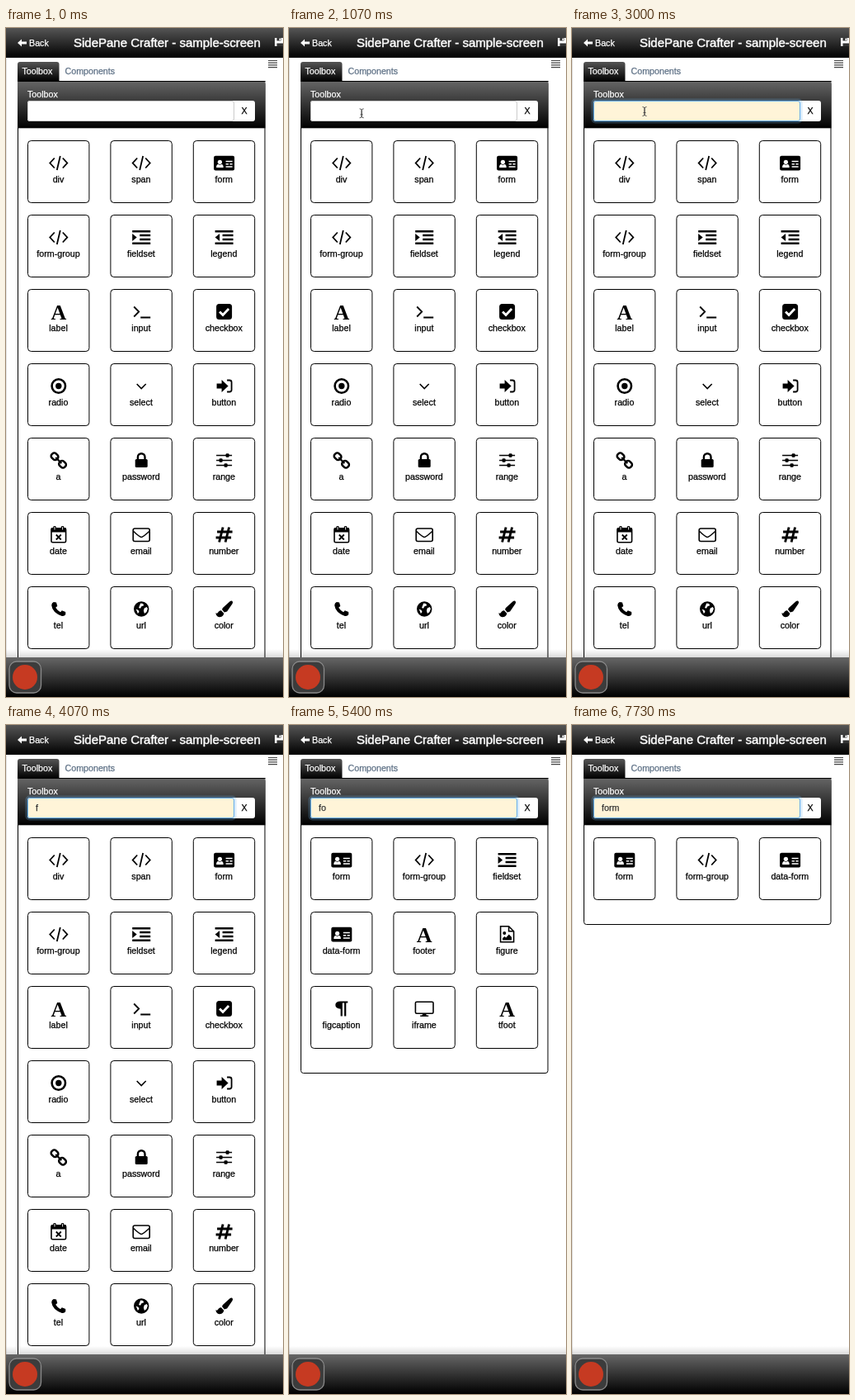
Animation, 336 px wide and 810 px high, one loop 8000 ms. Source, as an HTML page:

```html
<!DOCTYPE html>
<html lang="en">
<head>
<meta charset="utf-8">
<title>Toolbox search</title>
<style>
html, body { margin: 0; width: 100%; height: 100%; overflow: hidden; background: #fff; }
svg { display: block; width: 336px; height: 810px; }
text { font: 10.7px "Liberation Sans", Arial, sans-serif; stroke-width: .25; }
.title { font-size: 15px; stroke-width: .45; }
.white { fill: #fff; stroke: #fff; }
.black { fill: #000; stroke: #000; }
.mid { text-anchor: middle; }
.serif { font: bold 26px "Liberation Serif", serif; text-anchor: middle; }
.line { fill: none; stroke: #000; }
.cut { fill: none; stroke: #fff; }
</style>
</head>
<body>
<svg viewBox="0 0 336 810">
  <defs>
    <linearGradient id="bar" x2="0" y2="1">
      <stop offset="0" stop-color="#555"/><stop offset="1" stop-color="#000"/>
    </linearGradient>
    <linearGradient id="head" x2="0" y2="1">
      <stop offset="0" stop-color="#666"/><stop offset="1" stop-color="#000"/>
    </linearGradient>
    <linearGradient id="shade" x2="0" y2="1">
      <stop offset="0" stop-color="#000" stop-opacity="0"/><stop offset="1" stop-color="#000" stop-opacity=".14"/>
    </linearGradient>
  </defs>
  <rect width="336" height="810" fill="#fff"/>
  <rect y="36" width="1" height="726" fill="#e2e2e2"/>

  <g id="header">
    <rect width="336" height="36" fill="url(#bar)"/>
    <path d="M14 18l5-4.6v3h6v3.2h-6v3z" fill="#fff"/>
    <text class="white" x="28" y="22">Back</text>
    <text class="white title" x="82" y="23.3">SidePane Crafter - sample-screen</text>
    <path d="M326 12h11v10h-11z" fill="#fff"/>
    <path d="M328.5 12h5v3.5h-5zM328.5 18.5h8v3.5h-8z" fill="#333"/>
    <path d="M331.5 12.5h1.5v2.5h-1.5z" fill="#fff"/>
  </g>

  <path d="M318 39.5h11m-11 2.7h11m-11 2.7h11m-11 2.7h11" stroke="#444" stroke-width="1.2"/>

  <path d="M14 64.5V44q0-3 3-3h44.5q3 0 3 3v20.5z" fill="url(#bar)"/>
  <text class="white" x="19.5" y="56">Toolbox</text>
  <text x="71.5" y="56" fill="#5c6f84" stroke="#5c6f84">Components</text>

  <rect id="panel" x="14.5" y="64.5" width="299.5" rx="3" fill="#fff" stroke="#000"/>
  <rect x="14" y="64" width="300.5" height="57.3" fill="url(#head)"/>
  <path d="M14 64.5h300.5" stroke="#000"/>
  <text class="white" x="26" y="83.5">Toolbox</text>

  <rect x="26" y="88" width="276" height="25" rx="3" fill="#fff"/>
  <rect id="glow" x="25" y="87" width="253" height="27" rx="3.5" fill="none" stroke="#66afe9" stroke-width="3"/>
  <rect id="field" x="26.5" y="88.5" width="250" height="24" rx="2.5"/>
  <text class="black mid" x="289" y="104">X</text>
  <text id="typed" x="36" y="104" fill="#333" stroke="#333"></text>
  <rect id="caret" y="94" width="1" height="13" fill="#555"/>

  <g id="tiles"></g>

  <g id="footer">
    <rect y="752" width="336" height="10" fill="url(#shade)"/>
    <rect y="762" width="336" height="48" fill="url(#head)"/>
    <rect x="4" y="767" width="38.5" height="38" rx="9" fill="#3c3c3c" stroke="#8a8a8a" stroke-width="1.3"/>
    <circle cx="23" cy="786" r="15" fill="#c63a22"/>
  </g>

  <path id="arrow" d="M0 0v13l3-2.8 2.3 5.3 2.3-1-2.3-5.2h4.2z" fill="#000" stroke="#fff" stroke-width="1"/>
  <path id="beam" d="M-2.5-5.5q2.5 0 2.5 2v7q0 2-2.5 2M2.5-5.5q-2.5 0-2.5 2v7q0 2 2.5 2M-1.5 1.5h3" fill="none" stroke="#444" stroke-width=".9"/>
</svg>
<script>
const LOOP = 8000, STEP = 1000 / 15;
const $ = id => document.getElementById(id);
const line = (d, w = 1.8) => `<path class="line" d="${d}" stroke-width="${w}"/>`;
const cut = (d, w = 1.6) => `<path class="cut" d="${d}" stroke-width="${w}"/>`;
const solid = d => `<path d="${d}"/>`;
const outline = w => `class="line" stroke-width="${w}"`;
const box = (x, y, w, h, r, extra = '') => `<rect x="${x}" y="${y}" width="${w}" height="${h}" rx="${r}" ${extra}/>`;
const dot = (r, extra = '', x = 0, y = 0) => `<circle cx="${x}" cy="${y}" r="${r}" ${extra}/>`;

const rows = line('M-11-7.2h22M-2-2.4h13M-2 2.4h13M-11 7.2h22', 2.5);

// Each icon is drawn around its own centre.
const icons = {
  code: line('M-5-6l-5.5 6 5.5 6M5-6l5.5 6-5.5 6M2-8.5l-4 17', 1.8),
  card: box(-12.5, -8.8, 25, 17.8, 2) +
    '<g fill="#fff"><circle cx="-5.2" cy="-1.2" r="2.6"/><path d="M-9.5 5.5q0-4 2.4-4 1.9 1.4 3.8 0 2.4 0 2.4 4z"/></g>' +
    cut('M2-2h8M2 1.2h3.4m1.4 0h3.2M2 4.4h8', 1.5),
  indent: rows + solid('M-11-4.6l5.5 4.6-5.5 4.6z'),
  outdent: rows + solid('M-5.5-4.6l-5.5 4.6 5.5 4.6z'),
  letter: '<text class="serif" y="9.2">A</text>',
  prompt: line('M-9-6l6 6-6 6M-1 7h12', 1.8),
  check: box(-9.5, -9.5, 19, 19, 3.5) + cut('M-5.5 0l4 4 7-7.5', 2.8),
  target: dot(8.2, outline(2.6)) + dot(3.7),
  chevron: line('M-5.5-2.5l5.5 5.5 5.5-5.5', 1.6),
  enter: solid('M-9-3h6v-4.5l8 7.5-8 7.5v-4.5h-6z') + line('M3.5-7h3q2.5 0 2.5 2.5v9q0 2.5-2.5 2.5h-3', 1.8),
  link: '<g transform="rotate(45)">' + box(-11, -3.6, 8.6, 7.2, 3, outline(2.5)) +
    box(2.4, -3.6, 8.6, 7.2, 3, outline(2.5)) + line('M-5 0h10', 2.3) + '</g>',
  lock: box(-7.5, -1.5, 15, 10, 1.5) + line('M-4.3-1v-3a4.3 4.3 0 0 1 8.6 0v3', 2.4),
  sliders: line('M-9.5-6h19M-9.5 0h19M-9.5 6h19', 1.6) +
    box(2, -8.3, 4, 4.6, 1) + box(-6, -2.3, 4, 4.6, 1) + box(0, 3.7, 4, 4.6, 1),
  calendar: box(-8.8, -7.8, 17.6, 17, 1.5, outline(1.6)) + solid('M-9-8h18v5h-18z') +
    box(-6.5, -10.5, 3.4, 5.5, 1.3) + box(3.1, -10.5, 3.4, 5.5, 1.3) +
    cut('M-4.8-9.5v3.5M4.8-9.5v3.5', .9) + line('M-3 0l6 6M3 0l-6 6', 1.8),
  mail: box(-10, -7.5, 20, 15.5, 2, outline(1.6)) + line('M-10-4.5q8 7.5 10 7.5t10-7.5', 1.5),
  hash: line('M-1.5-9l-4.5 18M6-9l-4.5 18M-8.5-3.5h18.5M-10 3.5h18.5', 2.9),
  phone: solid('M-6-8.5L-2.8-8-1.5-3.6-3.6-1.8Q-1 2.2 2.2 3.8L4 1.8 8.4 3.4 8.5 6.5Q7 9 4 8.4-7.5 4.5-8.6-4.5-8.5-7.5-6-8.5Z'),
  globe: dot(9.2) + '<path fill="#fff" d="M-1-7l3 .6 1 2.2-2.8 1-1.4 2.4-2-.6 1-2.6zM3.5-1l3-1.5 1.2 2-1.4 4-2.6 2-1-3.5zM-6.5 0l3 1.5.8 2-1.6 2z"/>',
  brush: solid('M9.8-9.7q1.4 1.2.2 3.2L3.5 3 .2 4-2.6.5-1.6-1.5 7-9.3q1.6-1.4 2.8-.4z') +
    solid('M-3.6 1.7L-.3 5.3Q-1 9.8-6 9.7-9.5 9.2-10.3 4.8-8 6-7 3.5-5.6 1.4-3.6 1.7z'),
  image: line('M-8-9.7h10l6 6v13h-16zM2-9.7v6h6', 1.6) + dot(2, '', -3.3, -1.5) + solid('M-5.5 7v-2.5l2.5-2 1.6 1.4 3.6-3.9 3.3 3.5v3.5z'),
  pilcrow: solid('M7.5-9v2h-2v16h-2.2v-16h-2.3v16h-2.2v-8.8q-6.3-.2-6.3-4.6 0-4.6 6.3-4.6z'),
  screen: box(-10.8, -8.2, 21.6, 14, 1.5, outline(1.6)) + solid('M-2 6h4l.6 2h2.4v1.6h-10v-1.6h2.4z')
};

const catalogue = [
  ['div', 'code'], ['span', 'code'], ['form', 'card'],
  ['form-group', 'code'], ['fieldset', 'indent'], ['legend', 'outdent'],
  ['label', 'letter'], ['input', 'prompt'], ['checkbox', 'check'],
  ['radio', 'target'], ['select', 'chevron'], ['button', 'enter'],
  ['a', 'link'], ['password', 'lock'], ['range', 'sliders'],
  ['date', 'calendar'], ['email', 'mail'], ['number', 'hash'],
  ['tel', 'phone'], ['url', 'globe'], ['color', 'brush'],
  ['data-form', 'card'], ['footer', 'letter'], ['figure', 'image'],
  ['figcaption', 'pilcrow'], ['iframe', 'screen'], ['tfoot', 'letter']
];

const typing = [[0, ''], [3600, 'f'], [4930, 'fo'], [6130, 'for'], [7200, 'form']];
const searches = [[0, ''], [4400, 'f'], [5730, 'fo'], [6930, 'for']];
const caretOn = [[1470, 2000], [2470, 3000], [3470, 4070], [4400, 4870], [4930, 5400], [5730, 6600], [6930, 7730]];

const latest = (list, t) => list.filter(([at]) => at <= t).pop()[1];
const show = (id, on) => $(id).setAttribute('visibility', on ? 'visible' : 'hidden');
const move = (id, x, y) => $(id).setAttribute('transform', `translate(${x.toFixed(1)} ${y.toFixed(1)})`);
const clamp = v => Math.max(0, Math.min(1, v));
const mix = (a, b, u) => a + (b - a) * u;
const blend = (a, b, u) => `rgb(${a.map((v, i) => Math.round(mix(v, b[i], u)))})`;

function tile([name, icon], i, all) {
  const row = Math.floor(i / 3);
  const pair = all.length - row * 3 === 2;
  const col = pair && i % 3 ? 2 : i % 3;
  return `<g transform="translate(${26 + col * 100.4} ${136 + row * 90})">` +
    box(.5, .5, 74.4, 75, 4, 'fill="#fff" stroke="#000"') +
    `<g transform="translate(37.8 27.5)">${icons[icon]}</g>` +
    `<text class="black mid" x="37.5" y="50.7">${name}</text></g>`;
}

let shown = null;
function renderTiles(query) {
  if (query === shown) return;
  shown = query;
  const found = catalogue.filter(([name]) => name.includes(query));
  $('tiles').innerHTML = found.map(tile).join('');
  $('panel').setAttribute('height', 87 + Math.ceil(found.length / 3) * 90);
}

function pointer(k) {
  if (k <= 4) {
    const u = clamp((k - 2) / 2);
    return [mix(285, 192, u), mix(377, 284, u)];
  }
  const left = 1 - clamp((k - 6) / 12);
  return [88 + 104 * left ** 4.2, 101 + 183 * left ** 2.45];
}

function draw(t) {
  const k = Math.floor((t + 4) / STEP);
  renderTiles(latest(searches, t));

  const focus = clamp((k - 21) / 3);
  $('field').setAttribute('fill', blend([255, 255, 255], [255, 244, 216], focus));
  $('field').setAttribute('stroke', blend([204, 204, 204], [102, 175, 233], focus));
  $('glow').setAttribute('opacity', focus * .25);

  $('typed').textContent = latest(typing, t);
  $('caret').setAttribute('x', 36 + Math.round($('typed').getComputedTextLength()));
  show('caret', caretOn.some(([a, b]) => t >= a && t < b));

  const [x, y] = pointer(k);
  const visible = k >= 2 && t < 3600;
  const inField = y < 113;
  move('arrow', x, y);
  move('beam', x, y);
  show('arrow', visible && !inField);
  show('beam', visible && inField);
}

const start = performance.now();
function frame() {
  draw((performance.now() - start) % LOOP);
  requestAnimationFrame(frame);
}
frame();
</script>
</body>
</html>
```
